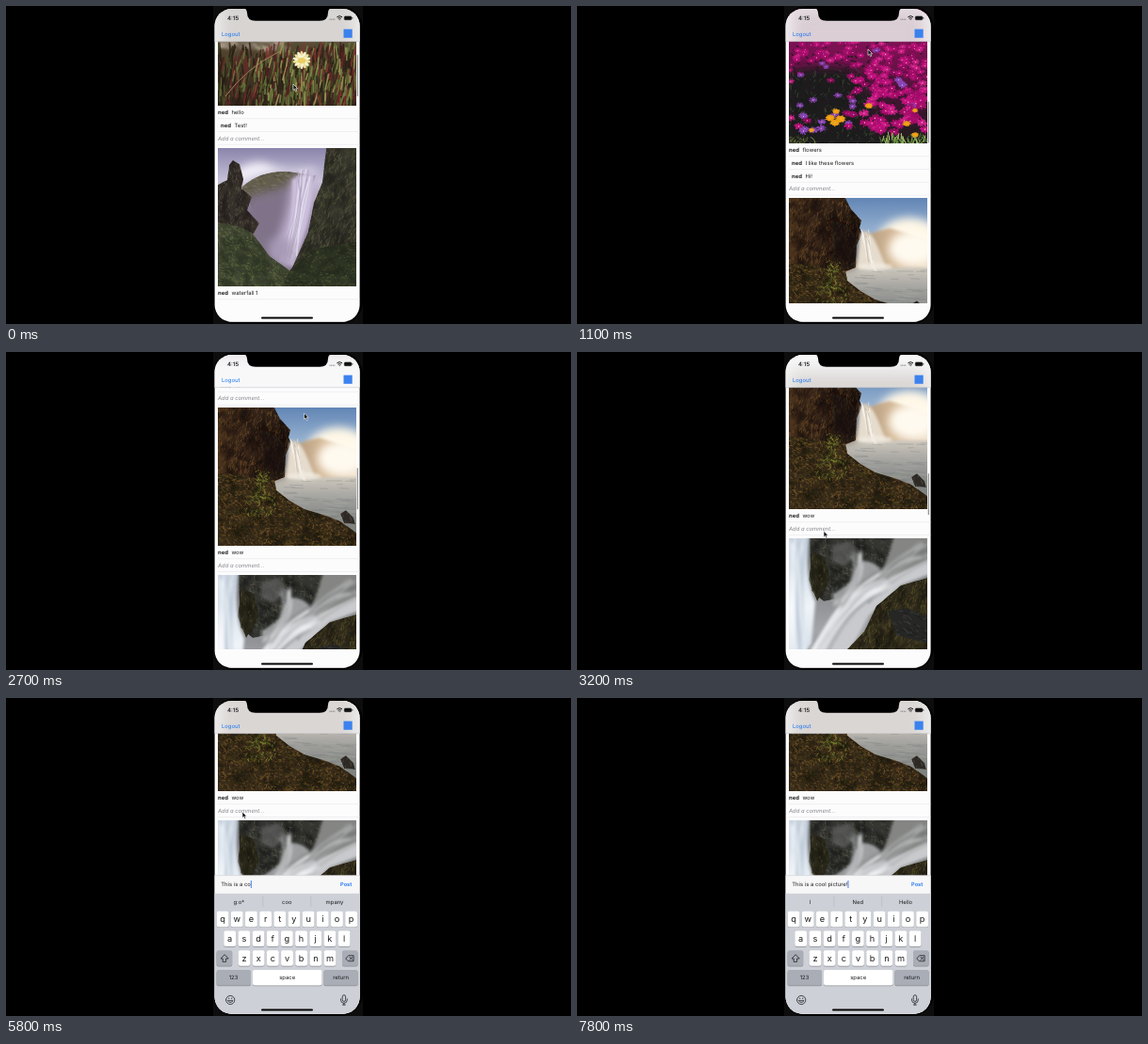
An HTML page for the animation above (8000 ms loop, 600 px wide and 338 px high).

```html
<!DOCTYPE html>
<html lang="en">
<head>
<meta charset="utf-8">
<title>Photo feed</title>
<style>
  html, body { margin: 0; width: 100%; height: 100%; overflow: hidden; background: #000; }
  svg { display: block; }
  #stage { width: 100%; height: 100%; }
  text { font-family: Inter, "Open Sans", sans-serif; font-size: 5.9px; fill: #1c1c1e; text-rendering: geometricPrecision; }
  .bold { font-weight: 700; }
  .hint { font-style: italic; fill: #85858a; }
  .blue { fill: #1a74f0; }
  .mid { text-anchor: middle; }
  .key { font-size: 9.2px; font-weight: 400; }
</style>
</head>
<body>
<svg id="stage" viewBox="0 0 600 338">
  <defs>
    <clipPath id="screen"><rect x="221.6" y="3.1" width="154" height="332.6" rx="18"/></clipPath>
    <clipPath id="list"><rect x="221" y="3" width="155" height="313"/></clipPath>
    <clipPath id="header"><rect x="221" y="3" width="155" height="34.7"/></clipPath>
    <filter id="lens" filterUnits="userSpaceOnUse" x="-5" y="-5" width="157" height="157"><feGaussianBlur stdDeviation=".45"/></filter>
    <filter id="soft" filterUnits="userSpaceOnUse" x="-20" y="-20" width="190" height="190"><feGaussianBlur stdDeviation="1.5"/></filter>
    <filter id="mist" filterUnits="userSpaceOnUse" x="-30" y="-30" width="210" height="210"><feGaussianBlur stdDeviation="5"/></filter>
    <filter id="frost" filterUnits="userSpaceOnUse" x="200" y="-60" width="200" height="1000"><feGaussianBlur stdDeviation="9"/></filter>
  </defs>
  <rect x="220" width="159" height="338" fill="#0d0d0d"/>
  <rect x="220" width="159" height="338" rx="24"/>
  <g clip-path="url(#screen)">
    <rect x="221" y="3" width="155" height="333" fill="#fdfcfd"/>
    <g clip-path="url(#list)"><g id="feed"></g></g>
    <rect id="scrollbar" x="372.7" width="1.3" height="44" rx=".6" fill="#555" opacity=".6"/>
    <g clip-path="url(#header)">
      <rect x="221" y="3" width="155" height="35" fill="#f8f8f9"/>
      <g id="tints" filter="url(#frost)" opacity=".23"></g>
    </g>
    <path d="M221 37.7h155" stroke="#bdbdc0" stroke-width=".5"/>
    <text class="blue" x="229" y="31.8">Logout</text>
    <rect x="358.5" y="24.6" width="9.2" height="9.2" fill="#3c82ee"/>
    <text x="235" y="14.9" style="font-weight:600;font-size:6px">4:15</text>
    <path d="M343.5 14.2h6" stroke="#777" stroke-width="1" stroke-dasharray="1 .6"/>
    <g fill="none" stroke="#111" stroke-width="1">
      <path d="M351.4 11.8q2.8-2.4 5.6 0M352.6 13.3q1.6-1.3 3.2 0M353.8 14.6h.8"/>
      <rect x="359.3" y="10.9" width="7.6" height="3.8" rx="1" fill="#111" stroke-width=".5"/>
      <path d="M367.8 12v1.6" stroke-width=".7"/>
    </g>
    <g id="composer">
      <rect x="221" y="188.5" width="155" height="170" fill="#f7f7f8"/>
      <path d="M221 188.6h155" stroke="#c9c9cc" stroke-width=".5"/>
      <text id="entry" x="228.3" y="200.2"></text>
      <rect id="caret" y="194" width=".9" height="8" fill="#3b6fe8"/>
      <text id="post" x="355" y="200.4" style="font-weight:600;font-size:5.7px">Post</text>
    </g>
    <g id="keyboard">
      <rect x="221" y="207.8" width="155" height="140" fill="#cdd0d6"/>
      <path d="M272.8 211v11M323.7 211v11" stroke="#b5b8be" stroke-width=".6"/>
    </g>
    <rect x="271" y="330.4" width="55" height="2" rx="1" fill="#050505"/>
  </g>
  <path d="M250 2q6 0 6 5 0 8.8 9 8.8h68q9 0 9-8.8 0-5 6-5z"/>
  <path id="pointer" d="M0 0v6.4l1.5-1.3 1.1 2.5 1.2-.5-1.1-2.4h2z" fill="#111" stroke="#fff" stroke-width=".6"/>
</svg>
<script>
const NS = 'http://www.w3.org/2000/svg';
const $ = id => document.getElementById(id);
const SIZE = 147, LEFT = 225;

function add(parent, tag, attrs = {}, text) {
  const node = document.createElementNS(NS, tag);
  for (const k in attrs) node.setAttribute(k, attrs[k]);
  if (text !== undefined) node.textContent = text;
  return parent.appendChild(node);
}

let seed = 11;
function rnd(a = 0, b = 1) {
  seed = (seed + 0x6D2B79F5) | 0;
  let t = Math.imul(seed ^ (seed >>> 15), 1 | seed);
  t = (t + Math.imul(t ^ (t >>> 7), 61 | t)) ^ t;
  return a + (b - a) * ((t ^ (t >>> 14)) >>> 0) / 4294967296;
}

const shape = (p, d, fill, extra) => add(p, 'path', { d, fill, ...extra });
const soft = { filter: 'url(#soft)' }, mist = { filter: 'url(#mist)' };

let ids = 0;
function gradient(p, stops, vertical = true) {
  const id = 'grad' + ids++;
  const g = add(p, 'linearGradient', { id, x1: 0, y1: 0, x2: vertical ? 0 : 1, y2: vertical ? 1 : 0 });
  stops.forEach((c, i) => add(g, 'stop', { offset: i / (stops.length - 1), 'stop-color': c }));
  return `url(#${id})`;
}

// Random short strokes, in batches so that the colours interleave.
function brush(p, n, [x, y, w, h], colours, { len = 3, angle = 90, spread = 25, width = 1, opacity = 1, ...extra } = {}) {
  for (let batch = 0; batch < 3; batch++) for (const stroke of colours) {
    let d = '';
    for (let i = 0; i < n / 3; i++) {
      const a = (angle + rnd(-spread, spread)) * Math.PI / 180, l = len * rnd(.4, 1.2);
      d += `M${rnd(x, x + w).toFixed(1)} ${rnd(y, y + h).toFixed(1)}l${(l * Math.cos(a)).toFixed(1)} ${(l * Math.sin(a)).toFixed(1)}`;
    }
    add(p, 'path', { d, fill: 'none', stroke, 'stroke-width': width, 'stroke-linecap': 'round', opacity, ...extra });
  }
}

// Strands of moving water along one bend, jittered at each point.
function flow(p, n, points, jitter, colours, width = 2) {
  for (let i = 0; i < n; i++) {
    const [a, b, c, d, e, f] = points.map(v => (v + rnd(-jitter, jitter)).toFixed(1));
    shape(p, `M${a} ${b}Q${c} ${d} ${e} ${f}`, 'none', { stroke: colours[i % colours.length], 'stroke-width': width, opacity: .55 });
  }
}

// A filled outline with dark hollows and fine grain inside it.
function textured(p, d, fill, n, box, colours, { dark, ...opts } = {}) {
  const id = 'clip' + ids++;
  shape(add(p, 'clipPath', { id }), d);
  const g = add(p, 'g', { 'clip-path': `url(#${id})` });
  shape(g, d, fill);
  const hollows = () => dark && brush(g, n / 7, box, [dark], { ...opts, len: 9, width: 4, opacity: .6, ...soft });
  hollows();
  brush(g, n, box, colours, { opacity: .7, ...opts });
  hollows();
}

const FULL = 'M-3 -3H150V150H-3z';

function meadow(p) {
  shape(p, FULL, gradient(p, ['#8b7b68', '#776a50', '#4a3b29', '#30251b']));
  brush(p, 40, [0, 60, 75, 26], ['#aa9c88', '#90826f', '#6f6553'], { len: 6, angle: 10, width: 4, ...soft });
  brush(p, 90, [0, 80, 147, 67], ['#2c2116', '#485428', '#672a29', '#6a773d', '#251c15'], { len: 16, angle: 96, spread: 14, width: 1.8, opacity: .8 });
  brush(p, 36, [40, 78, 107, 62], ['#7e8a4b', '#85342f', '#5d7236', '#a29a59', '#551f20', '#33291a'], { len: 15, angle: 97, spread: 12, width: 1.6, opacity: .85 });
  shape(p, 'M8 137Q30 107 66 89', 'none', { stroke: '#aa8464', 'stroke-width': .9 });
  for (let i = 0; i < 14; i++)
    add(p, 'ellipse', { cx: 89, cy: 90, rx: 1.7, ry: 5, fill: i % 2 ? '#f7f3d4' : '#efe19a', transform: `translate(0 4) rotate(${i * 25.7} 89 94.5)` });
  add(p, 'ellipse', { cx: 89, cy: 99, rx: 4.4, ry: 3, fill: '#e8cd62' });
}

function gorge(p) {
  shape(p, FULL, gradient(p, ['#8580a7', '#c7c1d8', '#918399', '#82748f', '#594e5e']));
  shape(p, 'M18 25Q40 10 55 18T105 22L100 29Q55 20 22 38z', '#f4f1f9', mist);
  textured(p, 'M25 42Q45 23 76 25L104 29 92 62 40 70z', '#625d4d', 80, [20, 22, 85, 45], ['#787653', '#4c493d', '#817b6b'], { len: 4, angle: 15 });
  shape(p, 'M30 52L84 38 80 95 58 125 28 88z', '#807389', mist);
  shape(p, 'M78 33L103 24 101 58Q92 96 76 130L55 111Q74 84 78 33z', '#bdaecd', mist);
  shape(p, 'M79 33L103 25Q99 61 94 83L80 126 66 119Q80 84 79 33z', '#cbc0dc', soft);
  flow(p, 26, [90, 29, 88, 60, 76, 112], 8, ['#ebe5f3', '#ad9fc0', '#d8cfe4'], 1.4);
  shape(p, 'M52 98L82 96 78 128 62 122z', '#a294b0', { ...mist, opacity: .8 });
  textured(p, 'M0 39L10 34 12 18 16 13 23 17 27 33 25 43 36 52 31 66 44 80 38 91 0 94z', '#38322c', 150, [0, 10, 45, 85], ['#514e40', '#29241f', '#5d5847'], { len: 2.5, dark: '#211c1a' });
  textured(p, 'M0 79Q24 82 37 91L55 115 76 130 82 147H0z', '#454936', 400, [0, 75, 85, 72], ['#5b6740', '#353b2d', '#68713f', '#3b4c2d'], { len: 2, angle: 45, spread: 50, dark: '#2a3023' });
  textured(p, 'M115 0H147V147H75L78 129 96 89 102 58 111 36z', '#37352c', 400, [72, 0, 75, 147], ['#4d5234', '#292824', '#5b593f', '#414731'], { len: 4, angle: 114, dark: '#23211d' });
  textured(p, 'M76 130L102 107 147 100V147H68z', '#313725', 150, [65, 98, 82, 49], ['#46512f', '#252b20', '#525b3a'], { len: 2, angle: 15, spread: 50, dark: '#20261c' });
}

function bloom(p, x, y, r, stroke, heart) {
  let d = '';
  for (let i = 0; i < 15; i++) {
    const a = i * .419 + rnd(0, .4), l = r * rnd(.7, 1.1);
    d += `M${x} ${y}l${(l * Math.cos(a)).toFixed(1)} ${(l * .7 * Math.sin(a)).toFixed(1)}`;
  }
  add(p, 'path', { d, stroke, 'stroke-width': r * .22, 'stroke-linecap': 'round' });
  add(p, 'circle', { cx: x, cy: y, r: r * .13, fill: heart });
}

function garden(p) {
  shape(p, FULL, gradient(p, ['#7c0f52', '#7a1151', '#431533', '#1d1d1a']));
  shape(p, 'M-5 72Q30 62 72 70L88 105 100 150H-5z', '#1c1e1b', mist);
  brush(p, 100, [0, 66, 100, 81], ['#344030', '#131714', '#46523b', '#271728'], { len: 4, spread: 60, opacity: .7 });
  brush(p, 110, [0, 0, 147, 140], ['#2d1626', '#1f1c1e'], { len: 3, angle: 0, spread: 60, width: 1.3 });
  const count = 420;
  for (let i = 0; i < count; i++) {
    const y = 135 * i / count, x = rnd(0, 147);
    const sparse = x < 62 + (y - 60) * .25 && y > 60;
    if (sparse && rnd() < .72) continue;
    const purple = rnd() < (sparse ? .6 : .03);
    const r = (2.8 + y * .024) * (sparse ? .8 : 1);
    const pink = ['#b30d74', '#c4127f', '#950c62', '#cf2089', '#a70c6b'][i % 5];
    bloom(p, x.toFixed(1), y.toFixed(1), r, purple ? '#8a45b4' : pink, purple ? '#d9c6ea' : '#eeb4b4');
  }
  const oranges = [[50, 113, 4], [44, 120, 5], [55, 121, 5], [49, 125, 5], [85, 107, 4], [134, 112, 3], [125, 126, 4], [134, 138, 4], [24, 133, 3]];
  for (const [x, y, r] of oranges) {
    add(p, 'ellipse', { cx: x, cy: y, rx: r * .8, ry: r * .65, fill: '#e6950f' });
    bloom(p, x, y, r, '#ee9f18', '#f8bf35');
  }
  brush(p, 24, [98, 142, 49, 8], ['#7ea648', '#a3be72', '#42692e'], { len: 7, angle: -90, spread: 40 });
  brush(p, 14, [0, 139, 28, 8], ['#6d7f3d', '#434f29'], { len: 4, spread: 60 });
}

function sunset(p) {
  shape(p, FULL, gradient(p, ['#5d82b3', '#95b0cf', '#e5dccb', '#a09f9a', '#757a7b']));
  add(p, 'ellipse', { cx: 128, cy: 43, rx: 32, ry: 22, fill: '#fff7e6', ...mist });
  shape(p, 'M82 40L95 35 107 32 120 36 147 46V76H86z', gradient(p, ['#b39a7c', '#d8bd9c', '#f2e3cb'], false), soft);
  add(p, 'ellipse', { cx: 130, cy: 54, rx: 24, ry: 18, fill: '#fffaf0', ...mist });
  shape(p, 'M54 74H150V150H54z', gradient(p, ['#cfc9be', '#9c9c99', '#80847f', '#787c7c']), soft);
  brush(p, 40, [65, 76, 82, 45], ['#b5b5b0', '#747a7a'], { len: 14, angle: 2, spread: 4, width: .8, opacity: .4 });
  textured(p, 'M0 0H60L66 12 77 24 75 32 78 38 72 50 71 74 58 79 0 100z', gradient(p, ['#4b331d', '#35241a', '#221811'], false), 330, [0, 0, 80, 95],
    ['#583c20', '#21180f', '#6d4d29', '#3b281a'], { len: 3.5, angle: 105, dark: '#17100c' });
  shape(p, 'M44 22L64 30 74 50 70 74 48 76z', '#140e0a', { ...mist, opacity: .7 });
  shape(p, 'M76 37Q85 33 91 45T103 74L73 75z', '#e6dccd', soft);
  flow(p, 20, [81, 38, 84, 50, 88, 73], 5, ['#fffdf8', '#c4b8a5', '#f0e8dc'], 1.2);
  add(p, 'ellipse', { cx: 92, cy: 73, rx: 18, ry: 4, fill: '#f2ece2', opacity: .75, ...soft });
  textured(p, 'M0 70Q25 70 42 76L50 70 60 76 62 88 76 99 92 108 115 115 130 121 147 133V147H0z', '#382b19', 420, [0, 64, 147, 83],
    ['#5d4520', '#261f12', '#745829', '#45431b', '#835a30', '#1e190f'], { len: 2.4, angle: 30, spread: 70, dark: '#191309' });
  brush(p, 26, [40, 66, 14, 30], ['#6a742b', '#81882f', '#39421a'], { len: 3, spread: 70, opacity: .8 });
  brush(p, 24, [30, 92, 32, 22], ['#646e28', '#7d8230', '#39421a'], { len: 2.5, spread: 70, opacity: .8 });
  textured(p, 'M130 113L136 109 144 117 146 124 134 123z', '#2d2924', 20, [128, 108, 20, 17], ['#514740']);
}

function rapids(p) {
  shape(p, FULL, gradient(p, ['#5c5d5b', '#858688', '#a3a5a9', '#737675']));
  textured(p, 'M22 0H113L108 30 92 50 72 60 37 67 24 56z', '#343531', 170, [18, 0, 98, 70], ['#4b4c47', '#232421', '#5b594b', '#3a3b30'],
    { len: 4, angle: 50, spread: 55, dark: '#161714' });
  textured(p, 'M21 44L25 14 38 20 44 44 30 67z', '#2d2b1d', 60, [18, 12, 30, 55], ['#504a2b', '#1d1b14'], { len: 3, dark: '#14130d' });
  shape(p, 'M46 8L66 2 72 18 58 30 46 24z', '#6a6b6b', { ...soft, opacity: .6 });
  shape(p, 'M-3 -3H22Q16 42 28 68L24 112 -3 150z', gradient(p, ['#bfcbd9', '#eff4f9', '#c5d0de']), soft);
  shape(p, 'M112 -3H150V30Q115 42 85 62Q104 30 112 -3z', '#858684', soft);
  shape(p, 'M150 22Q112 40 84 50T40 92L2 150H50Q68 112 85 82L119 50 150 38z', '#c9cacd', soft);
  shape(p, 'M78 24Q94 24 102 40L80 62 52 74 46 60 68 46z', '#a9aaad', { ...soft, opacity: .9 });
  const silk = ['#e9eaed', '#9c9ea2', '#d3d5d9', '#fafbfd'];
  const brushwork = add(p, 'g', soft);
  flow(brushwork, 22, [147, 12, 112, 28, 78, 60], 10, ['#c5c6c6', '#6c6e6d', '#a5a6a6'], 2.5);
  flow(brushwork, 24, [100, 48, 58, 62, 24, 138], 10, silk, 3);
  flow(brushwork, 14, [72, 18, 78, 44, 50, 72], 6, ['#c9cacc', '#77797a', '#e5e6e8'], 2);
  flow(brushwork, 18, [8, 0, 10, 50, 10, 130], 10, ['#fff', '#b1bfd0', '#e4ebf3'], 3);
  textured(p, 'M147 42L119 50 93 72 80 99 62 118 51 147H147z', '#302b1c', 300, [48, 40, 99, 107],
    ['#4d4824', '#201e18', '#5f562a', '#3a3c1d', '#4f3e29'], { len: 4, angle: 112, spread: 35, dark: '#171610' });
  textured(p, 'M105 77L124 74 147 83V112L114 103z', '#262725', 40, [103, 73, 44, 40], ['#414340', '#191b1b'], { len: 5, angle: 25 });
}

const USER = 'ned', HINT = 'Add a comment...';
const posts = [
  { y: -41, paint: meadow, tint: '#6c6152', rows: ['hello', 'Test!'] },
  { y: 151, paint: gorge, tint: '#777083', rows: ['waterfall 1'] },
  { y: 329, paint: garden, tint: '#7c475f', rows: ['flowers', 'I like these flowers', 'Hi!'] },
  { y: 534, paint: sunset, tint: '#786b5b', rows: ['wow'] },
  { y: 712, paint: rapids, tint: '#777', rows: [] }
];

for (const { y, paint, tint, rows } of posts) {
  const photo = add($('feed'), 'svg', { x: LEFT, y, width: SIZE, height: SIZE, viewBox: `0 0 ${SIZE} ${SIZE}` });
  paint(add(photo, 'g', { filter: 'url(#lens)' }));
  add($('tints'), 'rect', { x: LEFT, y, width: SIZE, height: SIZE, fill: tint });
  let base = y + SIZE + 9;
  const rule = () => add($('feed'), 'path', { d: `M225 ${base + 4.7}h151`, stroke: '#e1e1e4', 'stroke-width': .5 });
  rows.forEach((words, i) => {
    const x = i ? 228 : 225;
    add($('feed'), 'text', { x, y: base, class: 'bold' }, USER);
    add($('feed'), 'text', { x: x + 14.4, y: base }, words);
    rule();
    base += 13.8;
  });
  if (rows.length) {
    add($('feed'), 'text', { x: LEFT, y: base, class: 'hint' }, HINT);
    rule();
  }
}

// Keyboard
const board = $('keyboard'), letters = [];
function key(x, y, w, fill = '#fff') {
  add(board, 'rect', { x, y: y + .7, width: w, height: 16.6, rx: 2, fill: '#8b8e94' });
  return add(board, 'rect', { x, y, width: w, height: 16.6, rx: 2, fill });
}
['qwertyuiop', 'asdfghjkl', 'zxcvbnm'].forEach((row, r) => {
  [...row].forEach((ch, i) => {
    const cx = [230.1, 237.7, 253][r] + i * 15.17, y = 226.8 + r * 20.7;
    key(cx - 6.4, y, 12.8);
    letters.push(add(board, 'text', { x: cx, y: y + 11.4, class: 'key mid' }, ch));
  });
});
const GREY = '#a9adb6';
const shift = key(223.6, 268.2, 16.6, GREY);
key(357, 268.2, 16.6, GREY);
key(223.6, 289, 36.4, GREY);
key(262, 289, 73.5);
key(337.4, 289, 36.2, GREY);
[['123', 241.5], ['space', 298.7], ['return', 355.6]].forEach(([s, x]) => add(board, 'text', { x, y: 299.2, class: 'mid' }, s));
const line = d => add(board, 'path', { d, fill: 'none', stroke: '#222428', 'stroke-width': .8, 'stroke-linejoin': 'round', 'stroke-linecap': 'round' });
line('M231.9 273l-3.9 4h2.2v3.4h3.4V277h2.2z');
line('M361 276.7l2.7-3h5.4v6h-5.4zM365.1 275.3l2.7 2.8m0-2.8l-2.7 2.8');
line('M233.6 321a4.6 4.6 0 1 0 9.2 0a4.6 4.6 0 1 0-9.2 0M235.6 322q2.6 3.4 5.2 0zM236.7 319v.7M239.7 319v.7');
line('M357.2 317.4a1.7 1.7 0 0 1 3.4 0v3.4a1.7 1.7 0 0 1-3.4 0zM355.5 319.9v1a3.4 3.4 0 0 0 6.8 0v-1M358.9 324.3v1.8m-1.5 0h3');
const hints = [247.3, 298.3, 349].map(x => add(board, 'text', { x, y: 219, class: 'mid' }));

const MESSAGE = 'This is a cool picture!';
const SUGGESTIONS = [
  [0, 'I', 'The', 'I’m'], [1, '“T”', 'The', 'This'], [3, '“Thi”', 'This', 'Think'], [5, 'is', 'was', 'will'],
  [8, 'a', 'the', 'my'], [10, 'good', 'great', 'lot'], [12, 'g:o*', 'coo', 'mpany'], [13, '“coo”', 'cool', 'cook'],
  [15, 'and', 'place', 'thing'], [17, '“pi”', 'picture', 'pic'], [23, 'I', 'Ned', 'Hello']
];

// Motion
const LOOP = 8000, STEP = 100;
const clamp = v => Math.max(0, Math.min(1, v));
const span = (t, a, b) => clamp((t - a) / (b - a));
const smooth = u => u * u * (3 - 2 * u);

function scrollAt(t) {
  const glide = s => 479.5 - 149.5 * Math.exp((1100 - s) / 460);
  if (t < 700) return 69 * (1 - Math.exp(-t / 300)) / .903;
  if (t < 900) return 69 + (glide(900) - 69) * span(t, 700, 900);
  if (t < 3000) return glide(t);
  return glide(3000) + (582 - glide(3000)) * smooth(span(t, 3000, 3500));
}

const PATH = [[0, 305, 83], [600, 300, 230], [700, 300, 226], [900, 309, 46], [1300, 309, 46], [1900, 291, 233],
  [2150, 291, 233], [2700, 316.5, 65], [3000, 268, 228], [3500, 251, 121], [LOOP, 251, 121]];
function pointerAt(t) {
  const i = PATH.findIndex(k => k[0] > t), [a, x, y] = PATH[i - 1], [b, x2, y2] = PATH[i];
  const u = smooth(span(t, a, b));
  return [x + (x2 - x) * u, y + (y2 - y) * u];
}

const typedAt = t => t < 4600 ? 0 : t < 5800 ? Math.min(11, 1 + Math.floor((t - 4600) / 110)) : Math.min(23, 12 + Math.floor((t - 5800) / 135));

function render(t) {
  const y = Math.round(scrollAt(t)), move = `translate(0 ${-y})`;
  $('feed').setAttribute('transform', move);
  $('tints').setAttribute('transform', move);
  $('scrollbar').setAttribute('y', 52 + .15 * y);
  $('scrollbar').setAttribute('opacity', .6 * (1 - span(t, 4100, 4500)));
  $('pointer').setAttribute('transform', `translate(${pointerAt(t)})`);
  $('pointer').style.display = t < 6500 ? '' : 'none';

  const down = (1 - span(t, 4000, 4485)) ** 3;
  $('composer').setAttribute('transform', `translate(0 ${147 * down})`);
  board.setAttribute('transform', `translate(0 ${127.5 * down})`);

  const n = typedAt(t), entry = $('entry');
  entry.textContent = n ? MESSAGE.slice(0, n).replace(/ /g, '\u00a0') : HINT;
  entry.style.fill = n ? '' : '#a5a5aa';
  $('caret').setAttribute('x', 228.3 + (n ? entry.getComputedTextLength() : -.6));
  $('post').style.fill = n ? '#1a74f0' : '#a9a9ae';
  shift.setAttribute('fill', n ? GREY : '#fff');
  letters.forEach(node => node.textContent = n ? node.textContent.toLowerCase() : node.textContent.toUpperCase());
  const words = SUGGESTIONS.filter(s => s[0] <= n).pop();
  hints.forEach((node, i) => node.textContent = t < 4400 ? '' : words[i + 1]);
}

const start = performance.now();
let shown = -1;
function tick(now) {
  const t = Math.min(7800, Math.floor(Math.max(0, now - start) % LOOP / STEP) * STEP);
  if (t !== shown) render(shown = t);
  requestAnimationFrame(tick);
}
render(0);
requestAnimationFrame(tick);
</script>
</body>
</html>
```
